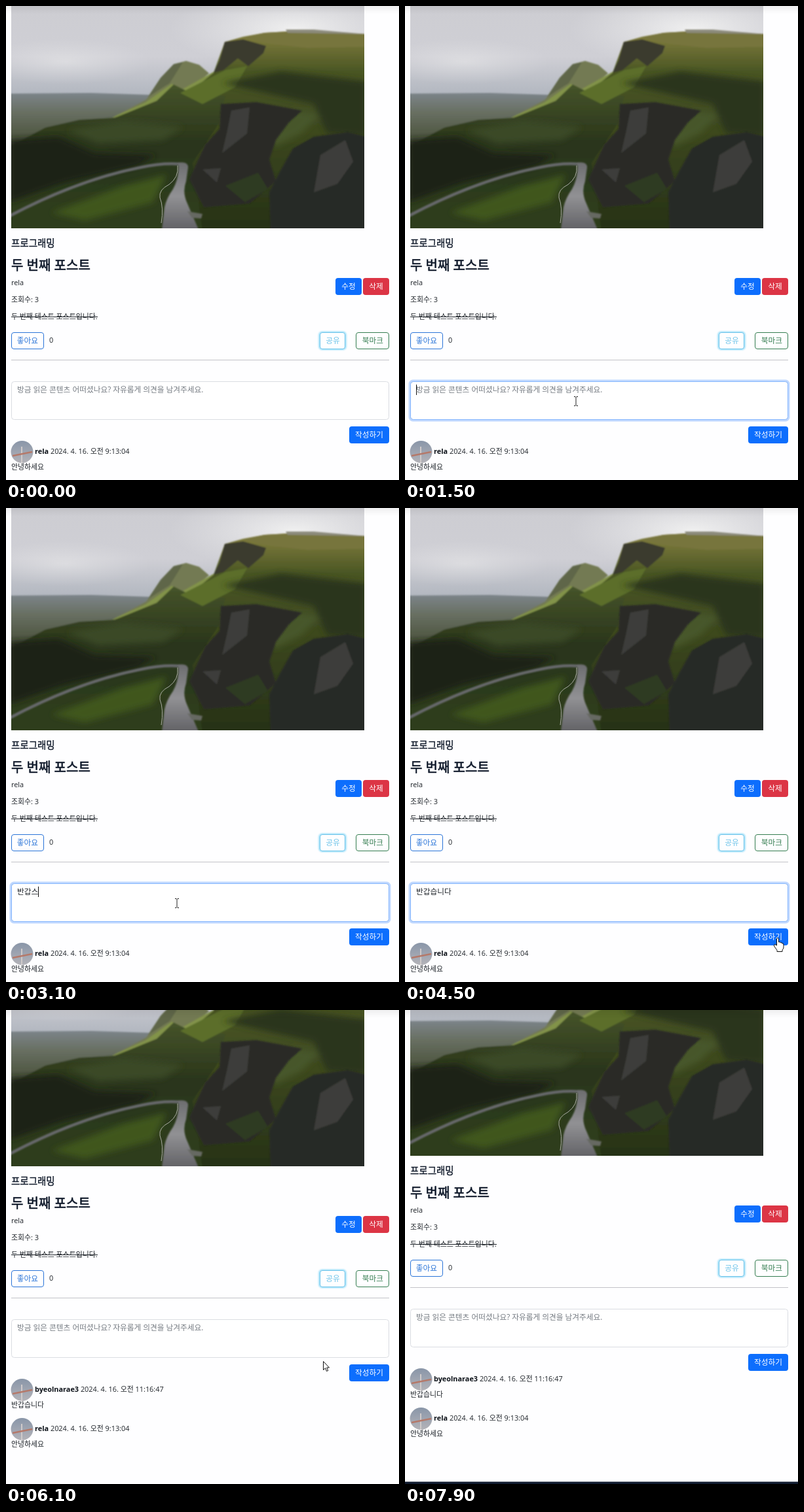
These frames come from a looping animation (600 by 725 pixels, 8000 ms). An HTML page:

```html
<!DOCTYPE html>
<html lang="ko">
<head>
<meta charset="utf-8">
<title>두 번째 포스트</title>
<style>
html, body { margin: 0; width: 100%; height: 100%; overflow: hidden; background: #fefeff; }
svg { display: block; width: 600px; height: 725px; }
text { font: 10.9px "Open Sans", "Noto Sans CJK KR", "Noto Sans CJK JP", sans-serif; fill: #1d2228; white-space: pre; }
.category, .title { fill: #101a2b; stroke: #101a2b; }
.category { font-size: 14.5px; stroke-width: .35px; }
.title { font-size: 20px; stroke-width: .6px; }
.name { font-weight: 700; fill: #0c1118; }
.form text { font-size: 11.7px; }
.button text { text-anchor: middle; fill: #fff; }
.outline rect { fill: #fefeff; stroke: currentColor; }
.outline text { fill: currentColor; }
.form .hint { fill: #757b82; }

.page, .cursor, .arrow, .beam, .hand, .focus, .older, .newer { animation: 8s step-end infinite; }
.page { animation-name: scroll; }
.cursor { animation-name: move; }
.arrow { animation-name: arrow; }
.beam { animation-name: beam; }
.hand { animation-name: hand; }
.focus { animation-name: focus; }
.older { animation-name: push; }
.newer { animation-name: post; }

@keyframes scroll {
  0% { transform: translateY(0); }
  74.9% { transform: translateY(-58px); }
  76% { transform: translateY(-101px); }
  77.4%, 100% { transform: translateY(-117px); }
}
@keyframes move {
  0% { transform: translate(330px, 700px); }
  10% { transform: translate(306px, 662px); }
  11.25% { transform: translate(276px, 622px); }
  12.5% { transform: translate(261px, 604px); }
  46.25% { transform: translate(325px, 617px); }
  47.5% { transform: translate(440px, 640px); }
  48.75% { transform: translate(538px, 657px); }
  50% { transform: translate(566px, 661px); }
  51.25% { transform: translate(569px, 657px); }
  65% { transform: translate(556px, 645px); }
  66.25% { transform: translate(524px, 600px); }
  67.5% { transform: translate(494px, 551px); }
  68.75%, 100% { transform: translate(484px, 537px); }
}
@keyframes arrow {
  0% { visibility: hidden; }
  8.75% { visibility: visible; }
  11.25% { visibility: hidden; }
  47.5% { visibility: visible; }
  48.75% { visibility: hidden; }
  66.25% { visibility: visible; }
  97.5%, 100% { visibility: hidden; }
}
@keyframes beam {
  0% { visibility: hidden; }
  11.25% { visibility: visible; }
  47.5%, 100% { visibility: hidden; }
}
@keyframes hand {
  0% { visibility: hidden; }
  48.75% { visibility: visible; }
  66.25%, 100% { visibility: hidden; }
}
@keyframes focus {
  0% { visibility: hidden; }
  15% { visibility: visible; }
  58.75%, 100% { visibility: hidden; }
}
@keyframes push {
  0% { transform: translateY(0); }
  60%, 100% { transform: translateY(60px); }
}
@keyframes post {
  0% { visibility: hidden; }
  60%, 100% { visibility: visible; }
}
</style>
</head>
<body>
<svg viewBox="0 0 600 725">
  <defs>
    <linearGradient id="sky" x2="0" y2="1">
      <stop offset="0" stop-color="#cdcdd2"/>
      <stop offset=".55" stop-color="#cfcfd5"/>
      <stop offset="1" stop-color="#b0b5be"/>
    </linearGradient>
    <linearGradient id="plain" x2="0" y2="1">
      <stop offset="0" stop-color="#7c848a"/>
      <stop offset=".35" stop-color="#697063"/>
      <stop offset="1" stop-color="#444c34"/>
    </linearGradient>
    <linearGradient id="slope" x2="0" y2="1">
      <stop offset="0" stop-color="#85803f"/>
      <stop offset=".2" stop-color="#4a5624"/>
      <stop offset="1" stop-color="#263117"/>
    </linearGradient>
    <linearGradient id="hill" x2="0" y2="1">
      <stop offset="0" stop-color="#46542a"/>
      <stop offset=".4" stop-color="#2a351b"/>
      <stop offset="1" stop-color="#2f3f1c"/>
    </linearGradient>
    <linearGradient id="road" x2="0" y2="1">
      <stop offset="0" stop-color="#6c6d6f"/>
      <stop offset=".5" stop-color="#919194"/>
      <stop offset="1" stop-color="#626266"/>
    </linearGradient>
    <linearGradient id="shade" x2="0" y2="1">
      <stop offset="0" stop-color="#000" stop-opacity=".06"/>
      <stop offset="1" stop-color="#000" stop-opacity="0"/>
    </linearGradient>
    <radialGradient id="mist">
      <stop offset="0" stop-color="#f0f0f0"/>
      <stop offset="1" stop-color="#e6e6e8" stop-opacity="0"/>
    </radialGradient>
    <linearGradient id="air" x2="0" y2="1">
      <stop offset="0" stop-color="#8895a8"/>
      <stop offset="1" stop-color="#b5b4b9"/>
    </linearGradient>
    <filter id="soft"><feGaussianBlur stdDeviation=".8"/></filter>
    <filter id="haze"><feGaussianBlur stdDeviation="5"/></filter>
    <filter id="glow" x="-30%" y="-30%" width="160%" height="160%"><feGaussianBlur stdDeviation="1.2"/></filter>
    <clipPath id="frame"><path d="M8 0H547V340H8Z"/></clipPath>
    <clipPath id="round"><circle cx="24.5" cy="682" r="17"/></clipPath>
    <g id="avatar" clip-path="url(#round)">
      <path fill="url(#air)" d="M7 664H42V700H7Z"/>
      <path fill="none" stroke="#cfcaca" stroke-width="2" d="M24 674V700"/>
      <path fill="none" stroke="#b5796a" stroke-width="2.5" d="M10 688L40 682"/>
    </g>
  </defs>

  <g class="page">
    <g clip-path="url(#frame)">
      <path fill="url(#sky)" d="M8 0H547V140H8Z"/>
      <ellipse cx="440" cy="35" rx="190" ry="60" fill="url(#mist)"/>
      <ellipse cx="90" cy="85" rx="130" ry="35" fill="url(#mist)" opacity=".45"/>
      <g filter="url(#soft)">
        <path fill="url(#plain)" d="M0 134L130 133L225 136V215H0Z"/>
        <path fill="#737a52" d="M160 172L214 143L236 110L256 89L275 84L295 90L310 103L276 130L300 170Z"/>
        <path fill="#5f6648" d="M217 139L236 110L256 89L270 86L250 118Z"/>
        <path fill="#82934a" d="M163 170L212 148L253 119L270 127L318 100L350 104L300 160Z"/>
        <path fill="url(#slope)" d="M258 150L317 102L334 55L362 47L395 41L430 39L550 43V345H280Z"/>
        <path fill="#77743d" d="M362 48L395 41L430 39L550 43V62L460 64L404 58Z"/>
        <path fill="#8c8b7b" d="M427 36L470 36L550 43L430 41Z"/>
        <path fill="#3a3b2e" d="M317 102L326 84L334 55L362 51L397 61L393 72L370 92L354 80L332 98Z"/>
        <path fill="url(#hill)" d="M0 218L60 186L112 174L166 171L230 145L256 120L276 130L335 138L325 180L285 240L300 345H0Z"/>
        <path fill="#5b6e2c" d="M266 133L335 98L368 92L350 124L300 150Z"/>
      </g>
      <g filter="url(#haze)">
        <path fill="#1e2418" d="M5 205L80 200L135 225L230 228L200 245L90 270L5 300Z"/>
        <path fill="#3a4a26" d="M95 190L180 175L270 185L240 205L140 210Z"/>
        <path fill="#40561f" d="M70 316L180 275L245 258L225 300L120 328Z"/>
        <path fill="#46562a" d="M395 185L440 160L480 165L450 195L410 215Z"/>
        <path fill="#2c361b" d="M330 118L420 100L550 115V200L490 195L470 150Z"/>
      </g>
      <g filter="url(#soft)">
        <path fill="#2a2b28" d="M328 150L382 147L452 160L432 178L412 205L402 235L412 268L372 302L302 308L280 265L304 212L326 188Z"/>
        <path fill="#282928" d="M438 218L470 200L522 193L550 200V345H404L402 285L420 250Z"/>
        <path fill="#3d3e3a" d="M344 160L372 155L368 195L330 225L338 190ZM480 228L518 205L530 238L506 272L470 285ZM300 250L328 248L322 270Z"/>
        <path fill="#2f3b20" d="M335 275L385 255L400 280L365 300Z"/>
        <path fill="none" stroke="#66686a" stroke-width="4.500" d="M2 323C60 292 130 262 205 247Q240 239 270 242"/>
        <path fill="url(#road)" d="M263 240Q278 237 278 247L275 268Q269 284 276 300L294 342H238L242 308Q245 294 255 280Q265 262 263 240Z"/>
        <path fill="#666962" d="M277 314L300 318L298 325L284 324Z"/>
      </g>
      <path fill="none" stroke="#a9aba2" d="M262 244Q264 262 249 273Q233 281 235 293Q241 308 237 332"/>
    </g>

    <text class="category" x="8" y="368">프로그래밍</text>
    <text class="title" x="8" y="404">두 번째 포스트</text>
    <text x="8" y="427">rela</text>
    <text x="8" y="453">조회수: 3</text>
    <text x="8" y="479">두 번째 테스트 포스트입니다.</text>
    <path stroke="#1d2228" d="M8 475.5H140"/>
    <text x="66" y="515">0</text>
    <path stroke="#c2c3c8" d="M8 541.5H585"/>

    <g class="form">
      <g class="button">
        <rect x="503" y="416" width="40" height="26" rx="4" fill="#0d6efd"/>
        <text x="523" y="432.5">수정</text>
        <rect x="545" y="416" width="40" height="26" rx="4" fill="#dc3545"/>
        <text x="565" y="432.5">삭제</text>
        <rect x="524" y="643" width="61" height="26" rx="4" fill="#0d6efd"/>
        <text x="554.5" y="660">작성하기</text>
      </g>
      <rect x="478.500" y="499" width="40" height="26" rx="4" fill="none" stroke="#7fd6f7" stroke-width="2" filter="url(#glow)"/>
      <g class="button outline" color="#2b75d8">
        <rect x="8.500" y="499.500" width="49" height="25" rx="3.500"/>
        <text x="33" y="516">좋아요</text>
      </g>
      <g class="button outline" color="#6cc3ea">
        <rect x="479.500" y="499.500" width="38" height="25" rx="3.500"/>
        <text x="499" y="516">공유</text>
      </g>
      <g class="button outline" color="#347d50">
        <rect x="534.500" y="499.500" width="50" height="25" rx="3.500"/>
        <text x="560" y="516">북마크</text>
      </g>

      <rect x="8.500" y="574.500" width="576" height="58" rx="4" fill="#fff" stroke="#dadde2"/>
      <g class="focus" fill="none">
        <rect x="7" y="573" width="579" height="61" rx="5" stroke="#0d6efd" stroke-opacity=".25" stroke-width="3"/>
        <rect x="8.500" y="574.500" width="576" height="58" rx="4" stroke="#86b7fe"/>
      </g>
      <text class="hint" id="hint" x="17" y="591">방금 읽은 콘텐츠 어떠셨나요? 자유롭게 의견을 남겨주세요.</text>
      <text id="entry" x="17" y="591"></text>
      <path id="caret" stroke="#111" d="M17.500 579V595" visibility="hidden"/>
    </g>

    <g class="older">
      <use href="#avatar"/>
      <text x="44" y="685"><tspan class="name">rela</tspan> 2024. 4. 16. 오전 9:13:04</text>
      <text x="8" y="709">안녕하세요</text>
    </g>
    <g class="newer">
      <use href="#avatar"/>
      <text x="44" y="685"><tspan class="name">byeolnarae3</tspan> 2024. 4. 16. 오전 11:16:47</text>
      <text x="8" y="709">반갑습니다</text>
    </g>
    <path fill="#111c30" d="M0 838.500H600V900H0Z"/>
  </g>

  <path fill="url(#shade)" d="M0 0H600V12H0Z"/>

  <g class="cursor" stroke-linejoin="round">
    <path class="arrow" fill="#fff" stroke="#111" d="M.5 .5V13.500L3.500 10.700L5.500 15.500L7.700 14.500L5.700 10H9.500Z"/>
    <path class="beam" fill="none" stroke="#222" d="M-3 -6.500H-1L0 -5.500L1 -6.500H3M0 -5.500V6.500M-3 7.500H-1L0 6.500L1 7.500H3"/>
    <path class="hand" fill="#fff" stroke="#111" d="M-1.500 12V1.500Q0 -.5 1.500 1.500V7Q3.500 6 4.500 8Q6.500 7 7 9Q9 8.500 9 11V15Q8.500 18 7 19V21.500H-1V19.500L-5.500 13Q-6 10.500 -4 10.500Z"/>
  </g>
</svg>
<script>
const LOOP = 8000, FOCUS = 1200, TYPE = 2100, KEY = 130, SEND = 4700;
const strokes = ['ㅂ', '바', '반', '반ㄱ', '반가', '반갑', '반갑ㅅ', '반갑스',
  '반갑습', '반갑습ㄴ', '반갑습니', '반갑습닏', '반갑습니다'];
const typed = TYPE + KEY * strokes.length;
const [hint, entry, caret] = ['hint', 'entry', 'caret'].map(id => document.getElementById(id));
const show = (el, on) => el.setAttribute('visibility', on ? 'visible' : 'hidden');

function draw(now) {
  const t = now % LOOP;
  const active = t >= FOCUS && t < SEND;
  const key = Math.min(strokes.length - 1, Math.floor((t - TYPE) / KEY));
  const value = active && key >= 0 ? strokes[key] : '';
  if (entry.textContent !== value) entry.textContent = value;
  show(hint, !value);

  // The caret stays lit while keys are pressed, then blinks.
  const idle = t < TYPE ? t - FOCUS : Math.max(0, t - typed);
  show(caret, active && idle % 1000 < 500);
  const x = value ? Math.round(entry.getComputedTextLength()) : 0;
  caret.setAttribute('transform', `translate(${x} 0)`);
  requestAnimationFrame(draw);
}
requestAnimationFrame(draw);
</script>
</body>
</html>
```
